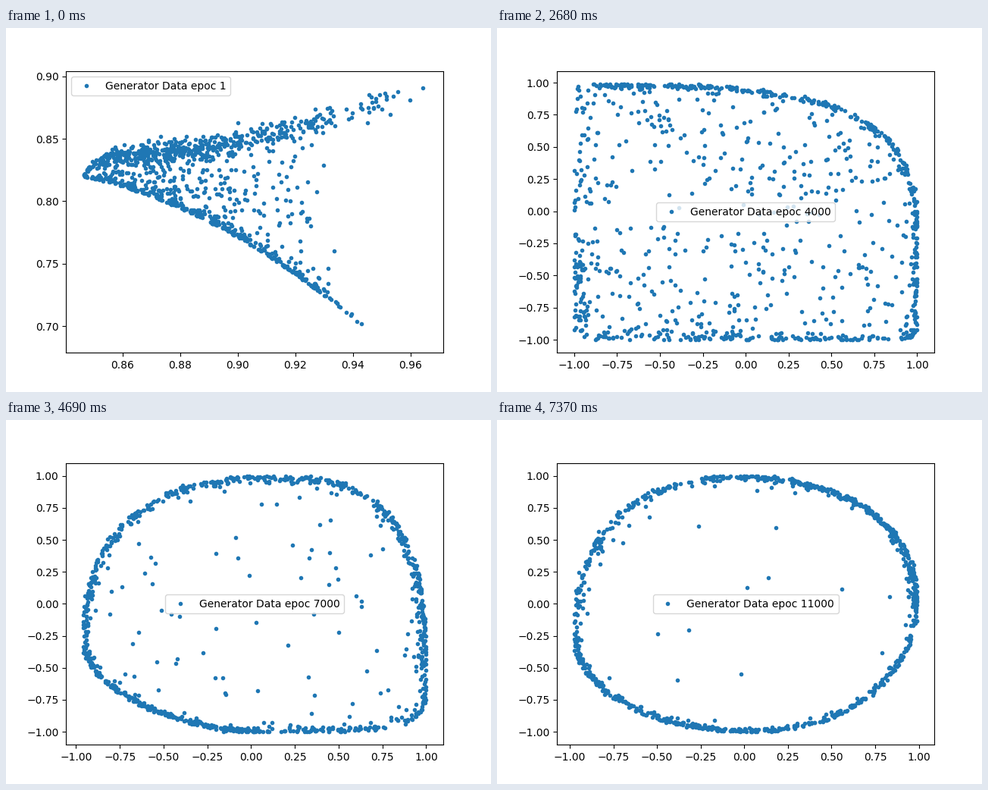
Write a matplotlib script that moves like this. It is 640 px wide and 480 px high and loops after 8000 ms.

```python
import matplotlib.pyplot as plt
import numpy as np
from matplotlib.animation import FuncAnimation

LOOP_MS = 8000

# Shapes are laid out in percent of the data range, x to the right, y up.


def wedge(rng):
    """Two ridges that open from a tip on the left, with a loose filling."""
    def upper(u):
        return 64 + 8.5 * (1 - np.exp(-u / 4)) + 27 * (u / 100) ** 2

    def lower(u):
        return 64 - 0.3 * u - 0.0052 * u ** 2

    top = 100 * rng.beta(1.1, 2, 450)
    low = 86 * rng.beta(1.2, 1.7, 310)
    mid = 4 + 70 * rng.beta(1.5, 1.8, 280)
    taper = 1 - np.exp(-top / 8)
    v_top = upper(top) + taper * rng.normal(0, 2.3, top.size)
    v_low = lower(low) + rng.exponential(1.3, low.size) * np.minimum(1, low / 8)
    v_mid = lower(mid) + (upper(mid) - lower(mid)) * rng.uniform(size=mid.size)
    return np.column_stack([np.hstack([top, low, mid]),
                            np.hstack([v_top, v_low, v_mid])])


def bend(rng, x_range, mid, width, n=1000):
    """A falling curve squashed by tanh on both axes, trailing to the left."""
    lo, hi = np.arctanh(x_range)
    a = rng.normal(mid - 0.03, width, n)
    a = np.where((a > lo) & (a < hi), a, rng.uniform(mid, hi, n))
    d = mid - a
    v = 50 + 50 * np.tanh(4.5 * d - 1.5 * d ** 2)
    loose = rng.uniform(size=n) < 0.25
    a -= rng.exponential(np.where(loose, 0.17, 0.012))
    u = 100 * (np.tanh(a) - x_range[0]) / (x_range[1] - x_range[0])
    return np.column_stack([u, v])


def ring(rng, sides, powers, counts, drifts, strays):
    """Four superellipse arcs that join where the ring touches each side."""
    right, top, left, bottom = sides
    touch = np.array([(100, right), (top, 100), (0, left), (bottom, 0)])
    corners = np.array([(100, 100), (0, 100), (0, 0), (100, 0)])
    t = np.linspace(0, np.pi / 2, 500)
    edge, shrink = [], []
    for q in range(4):
        a, b, k = touch[q], touch[(q + 1) % 4], corners[q]
        c = np.cos(t)[:, None] ** (2 / powers[q])
        s = np.sin(t)[:, None] ** (2 / powers[q])
        curve = a + b - k + (k - b) * c + (k - a) * s
        length = np.hypot(*np.diff(curve, axis=0).T).cumsum()
        length = np.insert(length, 0, 0)
        at = rng.uniform(0, length[-1], int(counts[q]))
        edge.append(np.column_stack([np.interp(at, length, x)
                                     for x in curve.T]))
        shrink.append(rng.exponential(drifts[q] / 100, at.size))
    edge, shrink = np.vstack(edge), np.hstack(shrink)
    rim = 50 + (edge - 50) * (1 - shrink[:, None])
    rim += rng.normal(0, 0.35, rim.shape)
    picked = edge[rng.integers(len(edge), size=int(strays))]
    depth = rng.uniform(size=(len(picked), 1)) ** 0.45
    return np.vstack([rim, 50 + (picked - 50) * depth])


# where the ring touches (right, top, left, bottom); then per arc, from the
# upper right counterclockwise: power, points, inward drift; last the strays
RINGS = {
    3: ((20, 5, 60, 40), (3.8, 9, 20, 20), (450, 30, 100, 150),
        (2, 5, 4, 1.5), 250),
    4: ((35, 5, 40, 50), (3.3, 9, 20, 20), (280, 50, 140, 130),
        (1.2, 5, 4, 1.5), 400),
    6: ((10, 62, 26, 50), (3.2, 2.8, 1.7, 8), (270, 260, 270, 70),
        (2, 2, 0.7, 2), 120),
    8: ((38, 50, 42, 50), (2.4, 2.25, 1.85, 1.8), (270, 200, 240, 230),
        (1.6, 1.2, 0.8, 1), 35),
    10: ((50, 25, 32, 70), (2.35, 1.8, 1.9, 1.15), (310, 190, 280, 130),
         (1, 5, 1.8, 1), 20),
    11: ((50, 48, 38, 52), (2.25, 2.4, 2.1, 2.05), (330, 170, 260, 190),
         (1.2, 1.6, 1, 1), 20),
}


def ring_at(k):
    """The ring of step k, or halfway between its neighbours."""
    if k in RINGS:
        return RINGS[k]
    return [np.add(a, b) / 2 for a, b in zip(RINGS[k - 1], RINGS[k + 1])]


X_RANGES = [(0.8463, 0.9655), (0.196, 0.98), (-0.356, 0.9603), (-1, 1),
            (-1, 1), (-0.98, 1), (-0.911, 0.998), (-0.959, 1),
            (-0.978, 0.996), (-0.961, 0.983), (-0.970, 0.974), (-0.974, 0.990)]
PLACES = ["upper left", "upper left", "lower left"]


def y_range(k):
    if k == 0:
        return 0.6890, 0.8937
    return -1, 0.988 if k in (4, 6) else 0.998


def shape(k):
    rng = np.random.default_rng(k)
    if k == 0:
        return wedge(rng)
    if k == 1:
        return bend(rng, X_RANGES[k], 1.2, 0.28)
    if k == 2:
        return bend(rng, X_RANGES[k], 0.942, 0.36)
    return ring(rng, *ring_at(k))


fig, ax = plt.subplots(figsize=(6.4, 4.8), dpi=100)
fig.subplots_adjust(left=79.3 / 640, right=577 / 640,
                    bottom=52 / 480, top=422.8 / 480)


def spread(part, lo, hi):
    return lo + part * (hi - lo)


def update(k):
    u, v = np.clip(shape(k), 0, 100).T / 100
    xr, yr = X_RANGES[k], y_range(k)
    ax.clear()
    ax.plot(spread(u, *xr), spread(v, *yr), ".",
            label=f"Generator Data epoc {max(1, 1000 * k)}")
    ends = np.array([-0.05, 1.05])
    ax.set_xlim(spread(ends, *xr))
    ax.set_ylim(spread(ends, *yr))
    ax.legend(loc=PLACES[k] if k < len(PLACES) else "center")
    return ax.lines


anim = FuncAnimation(fig, update, frames=len(X_RANGES),
                     interval=LOOP_MS / len(X_RANGES), repeat=True)
plt.show()
```
